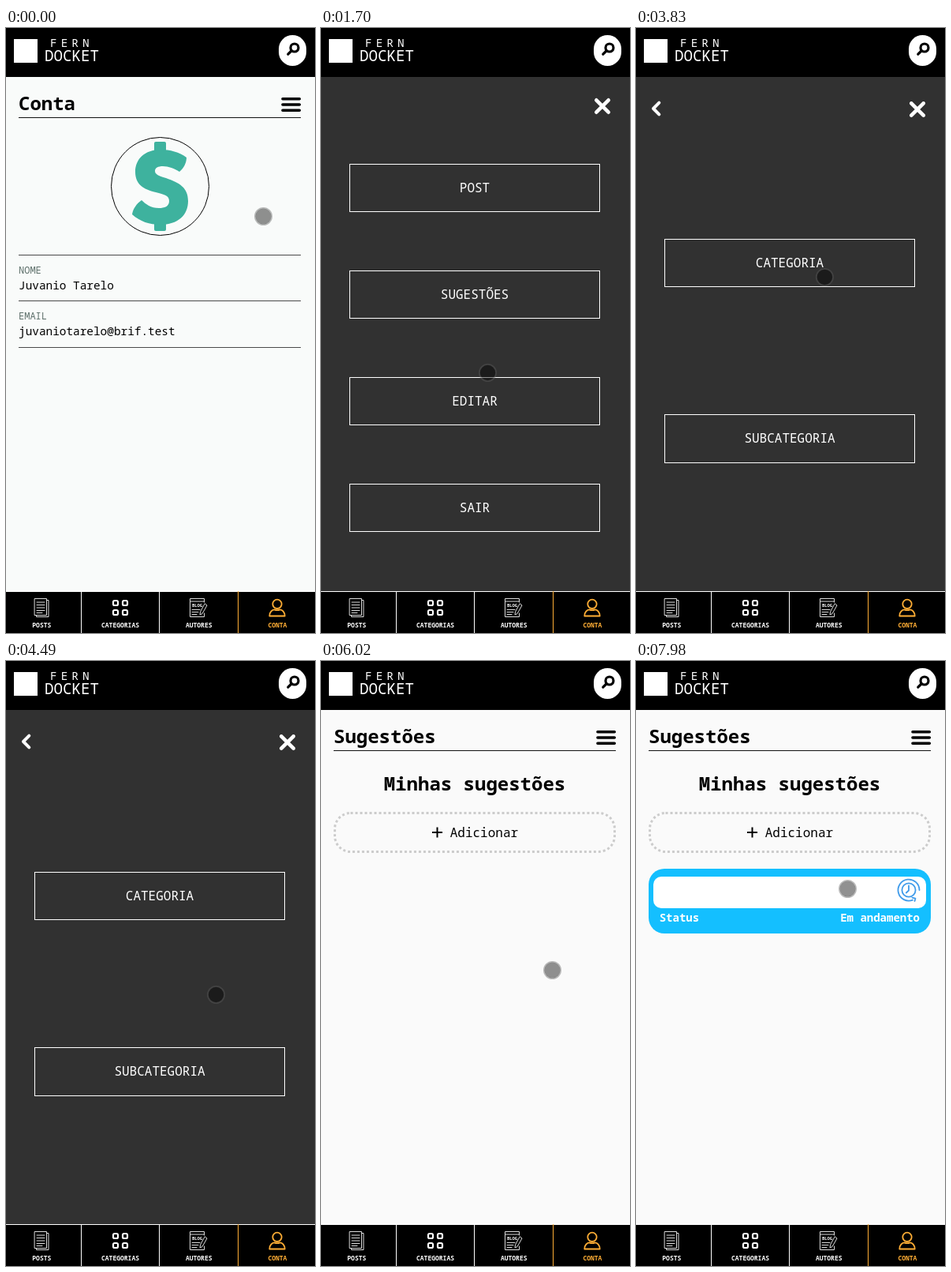
These frames come from a looping animation (392 by 766 pixels, 8 s). An HTML page:

```html
<!DOCTYPE html>
<html lang="pt">
<head>
<meta charset="utf-8">
<title>Conta e sugestões</title>
<style>
html, body { margin: 0; width: 100%; height: 100%; overflow: hidden; background: #000; }
svg { display: block; width: 392px; height: 766px; font-family: "Noto Sans Mono", "DejaVu Sans Mono", monospace; }
.light { font-weight: 300; }
.bold { font-weight: 700; }
.mid { text-anchor: middle; }
.label { font-size: 12px; font-weight: 300; fill: #5f716c; }
.value { font-size: 14.4px; font-weight: 300; }
.title { font-size: 24px; font-weight: 700; }
.btn { font-size: 16px; fill: #fff; text-anchor: middle; }
.nav { font-size: 8px; font-weight: 700; text-anchor: middle; }
.line { fill: none; stroke-linecap: round; stroke-linejoin: round; }
</style>
</head>
<body>
<svg viewBox="0 0 392 766">
  <defs>
    <g id="bars" class="line" stroke="#000" stroke-width="3.6">
      <path d="M351 89.7H372.3M351 97H372.3M351 104.3H372.3"/>
    </g>
    <path id="cross" class="line" stroke="#fff" stroke-width="4.6" d="M-7.7 -7.7L7.7 7.7M7.7 -7.7L-7.7 7.7"/>
  </defs>

  <g id="account">
    <rect y="62" width="392" height="652" fill="#f9fbfa"/>
    <text class="title" x="16" y="104">Conta</text>
    <use href="#bars"/>
    <rect x="16" y="113" width="358" height="1" fill="#111"/>
    <circle cx="195.5" cy="200.5" r="62" fill="none" stroke="#000"/>
    <g fill="#3eb29e">
      <rect x="188" y="144" width="15" height="20" rx="2"/>
      <rect x="188" y="240" width="15" height="17" rx="2"/>
      <path d="M229 164C220 157 208 154 196 154C176 154 164 166 164 182C164 198 174 204 190 208C201 211 207 212 207 219C207 226 201 228 194 228C184 228 177 223 172 218C166 222 161 229 160 236C170 245 182 249 196 249C218 249 231 237 231 219C231 202 220 196 203 190C193 187 189 185 189 181C189 177 193 175 199 175C206 175 214 178 220 182C226 177 229 170 229 164Z"/>
    </g>
    <path d="M16 287.5H374M16 345.5H374M16 404.5H374" stroke="#4a4a4a"/>
    <text class="label" x="16" y="310.5">NOME</text>
    <text class="value" x="16" y="331">Juvanio Tarelo</text>
    <text class="label" x="16" y="368.5">EMAIL</text>
    <text class="value" x="16" y="389">juvaniotarelo@brif.test</text>
  </g>

  <g id="menu">
    <rect y="62" width="392" height="652" fill="#313131"/>
    <g id="mainItems"><use href="#cross" x="357" y="99"/></g>
    <g id="subItems">
      <path class="line" stroke="#fff" stroke-width="4" d="M29.3 94.7L22 102L29.3 109.3"/>
      <use href="#cross" x="357" y="103"/>
      <rect id="tap" x="37" y="268" width="316" height="59" fill="#000" fill-opacity=".18"/>
    </g>
  </g>

  <g id="suggest">
    <rect y="62" width="392" height="652" fill="#fafafa"/>
    <text class="title" x="16" y="104">Sugestões</text>
    <use href="#bars"/>
    <rect x="16" y="113" width="358" height="1" fill="#111"/>
    <g id="list">
      <text class="title mid" x="195" y="164">Minhas sugestões</text>
      <rect x="17.5" y="192.5" width="355" height="49" rx="20" fill="none" stroke="#ccc" stroke-width="3" stroke-dasharray="3 3"/>
      <path d="M141 217H154M147.5 210.5V223.5" stroke="#000" stroke-width="2"/>
      <text class="light" font-size="16" x="163.7" y="223">Adicionar</text>
    </g>
    <path id="spinner" class="line" stroke="#bbb" stroke-width="5" d="M0 -28A28 28 0 1 1 -28 0"/>
    <g id="card">
      <rect x="16" y="263" width="358" height="82" rx="20" fill="#14bfff"/>
      <rect x="22" y="273" width="346" height="40" rx="10" fill="#fff"/>
      <g class="line" stroke="#3f9bea" stroke-width="1.8">
        <path d="M359.5 290A13.5 13.5 0 1 0 351 302.6M350.5 299.6L354.5 300.6L353.5 304"/>
        <circle cx="346" cy="290" r="8.6"/>
        <path d="M346 284.5V290.5L342.8 293.5"/>
      </g>
      <g font-size="14" font-weight="600" fill="#fff">
        <text x="29.7" y="330">Status</text>
        <text x="360" y="330" text-anchor="end">Em andamento</text>
      </g>
    </g>
  </g>

  <g id="header" fill="#fff">
    <rect width="392" height="62" fill="#000"/>
    <rect x="10" y="14" width="30" height="30"/>
    <text class="light" font-size="14.4" letter-spacing="5" x="56" y="23.5">FERN</text>
    <text class="light" font-size="19.2" x="49" y="42">DOCKET</text>
    <rect x="346" y="9" width="35" height="39" rx="17.5"/>
    <g class="line" stroke="#000" stroke-width="3.2">
      <circle cx="366" cy="25" r="5"/>
      <path d="M362 29L357.8 33.2"/>
    </g>
  </g>

  <g id="tabs">
    <rect y="713" width="392" height="53" fill="#000"/>
    <path d="M0 713.5H392M95.5 714V766M194.5 714V766" stroke="#fff"/>
    <path d="M294.5 713V766" stroke="#ffae35"/>
    <g class="line" stroke="#ddd" stroke-width="1">
      <path d="M36.5 722.5H51.5V743.5H36.5ZM51.5 724.5H54V745.5H38.5V743.5"/>
      <path d="M39 727H49M39 730.5H49M39 734H49M39 737.5H49M39 740.5H46"/>
    </g>
    <g id="grid" fill="none" stroke="#fff" stroke-width="2.2"></g>
    <g class="line" stroke="#ddd" stroke-width="1">
      <path d="M251.5 727V722.5H233.5V745.5H251.5V741M233.5 726H251.5M236 736.5H246M236 739.5H244M236 742.5H242"/>
      <path d="M252.5 729L255 731L249 741.5L246 743L246.5 739.5Z"/>
    </g>
    <text class="bold mid" font-size="5.5" fill="#fff" x="242.5" y="733">BLOG</text>
    <g class="line" stroke="#ffae35" stroke-width="1.8">
      <circle cx="344" cy="729.3" r="5.7"/>
      <path d="M334.3 744.5C334.3 739.5 337.5 736.7 340.5 736.4Q344 738 347.5 736.4C350.5 736.7 353.7 739.5 353.7 744.5Z"/>
    </g>
  </g>

  <g id="pointer">
    <g id="idle">
      <circle r="10" fill="#000" fill-opacity=".43"/>
      <circle r="10.6" fill="none" stroke="#5d5d5d" stroke-opacity=".42" stroke-width="1.8"/>
    </g>
    <g id="press">
      <circle r="12" fill="#d6cb28" fill-opacity=".78"/>
      <circle r="9.5" fill="#75700c" fill-opacity=".3"/>
    </g>
  </g>
</svg>
<script>
const LOOP = 8000;
const NS = "http://www.w3.org/2000/svg";
const $ = id => document.getElementById(id);

function add(parent, tag, attrs, text = "") {
  const el = document.createElementNS(NS, tag);
  for (const k in attrs) el.setAttribute(k, attrs[k]);
  el.textContent = text;
  parent.append(el);
}

function button(parent, y, height, label) {
  add(parent, "rect", { x: 36.5, y: y + .5, width: 317, height, fill: "none", stroke: "#fff" });
  add(parent, "text", { class: "btn", x: 195, y: y + 36 }, label);
}

["POST", "SUGESTÕES", "EDITAR", "SAIR"].forEach((s, i) => button($("mainItems"), 172 + 135 * i, 60, s));
button($("subItems"), 267, 60, "CATEGORIA");
button($("subItems"), 489, 61, "SUBCATEGORIA");

for (const x of [136, 148]) for (const y of [725, 737])
  add($("grid"), "rect", { x, y, width: 6, height: 6, rx: 1.8 });

["POSTS", "CATEGORIAS", "AUTORES", "CONTA"].forEach((s, i) =>
  add($("tabs"), "text", { class: "nav", x: 45.3 + 99.7 * i, y: 759, fill: i === 3 ? "#ffae35" : "#fff" }, s));

// Pointer path: time, x, y
const path = [
  [0, 326.5, 238.5], [760, 365, 107], [1090, 365, 107], [1640, 212, 433],
  [1700, 211.5, 436.5], [1850, 208, 449], [2470, 214, 328], [2760, 214, 328],
  [3150, 248.5, 366.5], [3420, 244, 335], [3560, 238, 310], [3760, 238, 310],
  [4290, 266, 421], [4490, 266.5, 422.5], [4800, 269, 422], [5220, 284, 403],
  [5560, 293, 395.5], [5819, 293, 395.5], [5820, 293, 392], [6019, 293, 392],
  [6020, 293.5, 391.5], [6560, 140, 200], [6780, 127, 229], [7000, 125, 231],
  [7650, 42, 291], [7910, 294, 289], [7980, 268.5, 288.5], [8000, 268.5, 288.5]
];
const presses = [[890, 1090], [2670, 2800], [3560, 3700]];

const clamp = v => Math.min(1, Math.max(0, v));
const ramp = (t, from, span) => clamp((t - from) / span);
const within = (t, [a, b]) => t >= a && t < b;
const alpha = (id, v) => $(id).style.opacity = +v;

function pointerAt(t) {
  const i = Math.max(1, path.findIndex(p => p[0] > t));
  const [t0, x0, y0] = path[i - 1], [t1, x1, y1] = path[i];
  const u = clamp((t - t0) / (t1 - t0)), e = u * u * (3 - 2 * u);
  return [x0 + (x1 - x0) * e, y0 + (y1 - y0) * e];
}

function draw(t) {
  const swap = ramp(t, 2760, 240);
  alpha("menu", ramp(t, 1090, 240));
  alpha("mainItems", 1 - swap);
  alpha("subItems", swap);
  alpha("tap", within(t, [3560, 3830]));
  alpha("suggest", t >= 4620);
  alpha("list", t >= 5000);
  alpha("spinner", within(t, [4620, 5000]));
  alpha("card", ramp(t, 6900, 140));
  $("spinner").setAttribute("transform", `translate(195 383) rotate(${t * .36})`);

  const down = presses.some(p => within(t, p));
  alpha("press", down);
  alpha("idle", !down);
  $("pointer").setAttribute("transform", `translate(${pointerAt(t)})`);
}

const start = performance.now();
function tick() {
  draw((performance.now() - start) % LOOP);
  requestAnimationFrame(tick);
}
tick();
</script>
</body>
</html>
```
